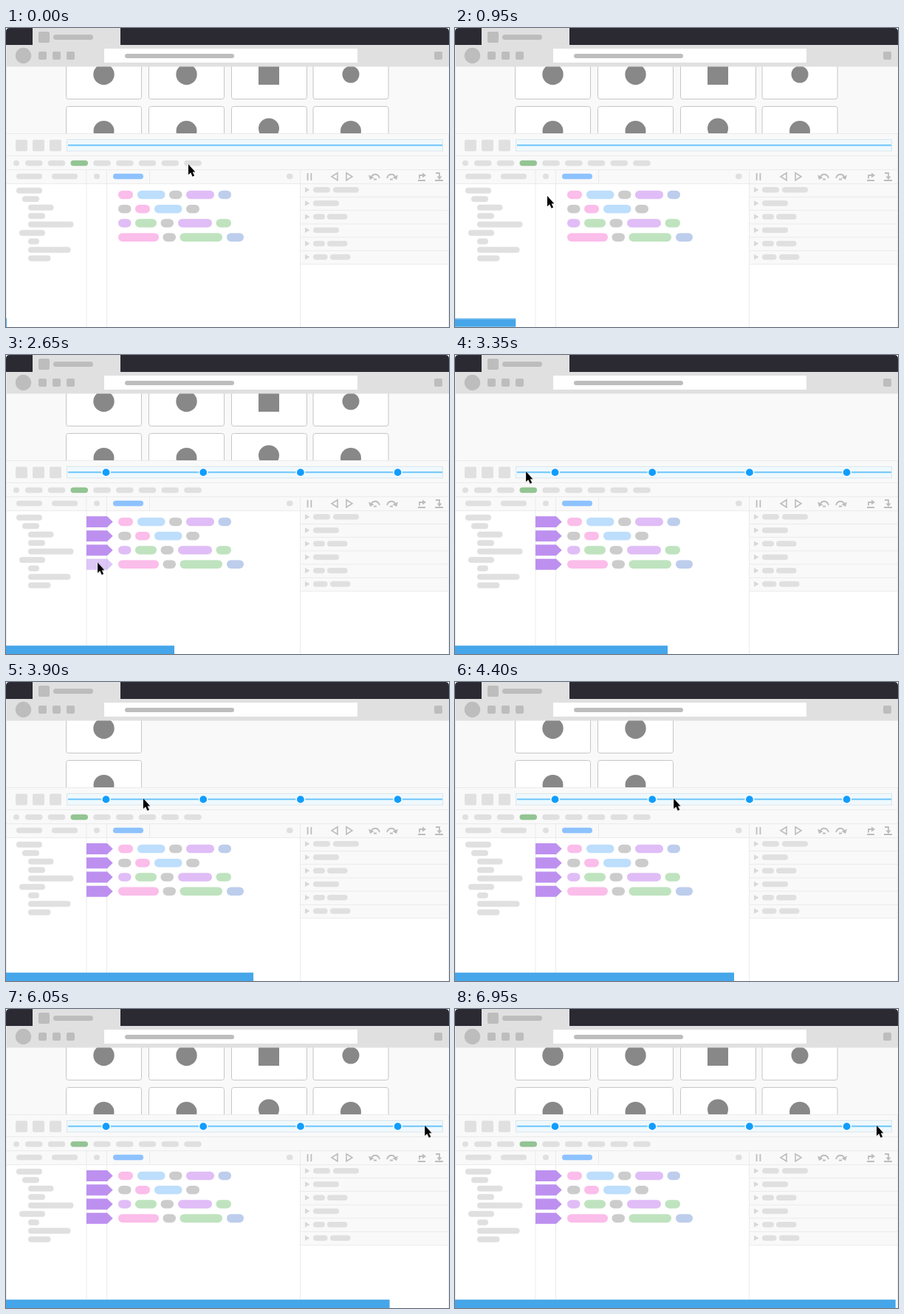
An HTML page that plays this animation: 600x406 px, repeating every 7 s.

```html
<!DOCTYPE html>
<html lang="en">
<head>
<meta charset="utf-8">
<title>Debugger timeline</title>
<style>
  html, body { margin: 0; width: 100%; height: 100%; overflow: hidden; background: #fff; }
  svg { display: block; width: 600px; height: 406px; }
  .anim, .dot, .mark, .card, #cursor, #bar { animation: 7s linear infinite; }
  .dot, .card { animation-timing-function: step-end; }

  #bar { animation-name: load; }
  @keyframes load { from { transform: scaleX(.0015); } to { transform: scaleX(1.0015); } }

  #cursor { animation-name: roam; }
  @keyframes roam {
    0% { transform: translate(247px, 185px); animation-timing-function: ease-in-out; }
    11% { transform: translate(125px, 228px); }
    14.3% { transform: translate(125px, 228px); }
    38.9% { transform: translate(124px, 284px); animation-timing-function: ease-in-out; }
    46.4% { transform: translate(96px, 158px); }
    47.86% { transform: translate(96px, 158px); animation-timing-function: cubic-bezier(.4, .2, .67, .67); }
    62.86% { transform: translate(296px, 158px); }
    77.14% { transform: translate(497px, 158px); animation-timing-function: cubic-bezier(.3, .73, .6, 1); }
    90%, 100% { transform: translate(571px, 158px); }
  }

  .dot0 { animation-name: dot0; } .dot1 { animation-name: dot1; }
  .dot2 { animation-name: dot2; } .dot3 { animation-name: dot3; }
  @keyframes dot0 { 0% { opacity: 0; } 15%, 100% { opacity: 1; } }
  @keyframes dot1 { 0% { opacity: 0; } 22.14%, 100% { opacity: 1; } }
  @keyframes dot2 { 0% { opacity: 0; } 29.29%, 100% { opacity: 1; } }
  @keyframes dot3 { 0% { opacity: 0; } 36.43%, 100% { opacity: 1; } }

  .mark0 { animation-name: mark0; } .mark1 { animation-name: mark1; }
  .mark2 { animation-name: mark2; } .mark3 { animation-name: mark3; }
  @keyframes mark0 { 0%, 15% { opacity: 0; } 17.86%, 100% { opacity: 1; } }
  @keyframes mark1 { 0%, 22.14% { opacity: 0; } 25%, 100% { opacity: 1; } }
  @keyframes mark2 { 0%, 29.29% { opacity: 0; } 32.14%, 100% { opacity: 1; } }
  @keyframes mark3 { 0%, 36.43% { opacity: 0; } 39.29%, 100% { opacity: 1; } }

  /* cards vanish together, then return as the cursor passes each dot */
  .card0 { animation-name: card0; } .card1 { animation-name: card1; }
  .card2 { animation-name: card2; } .card3 { animation-name: card3; }
  @keyframes card0 { 0% { opacity: 1; } 45.71% { opacity: 0; } 52.14%, 100% { opacity: 1; } }
  @keyframes card1 { 0% { opacity: 1; } 45.71% { opacity: 0; } 60.86%, 100% { opacity: 1; } }
  @keyframes card2 { 0% { opacity: 1; } 45.71% { opacity: 0; } 70.17%, 100% { opacity: 1; } }
  @keyframes card3 { 0% { opacity: 1; } 45.71% { opacity: 0; } 79.86%, 100% { opacity: 1; } }
</style>
</head>
<body>
<svg viewBox="0 0 600 406">
  <rect y="52" width="600" height="92" fill="#f9f9f9"/>
  <g id="cards"></g>

  <!-- browser chrome -->
  <path d="M0 23V5Q0 0 5 0H595Q600 0 600 5V23Z" fill="#2b2932"/>
  <path d="M36 0H155V23H600V52.5H0V23H36Z" fill="#e0e0e0"/>
  <path d="M.5 23V143" stroke="#ececec"/>
  <rect x="133" y="28" width="343" height="19" fill="#fff"/>
  <circle cx="23.5" cy="37.5" r="10.7" fill="#bdbdbd"/>
  <g id="chrome"></g>

  <!-- panel backgrounds -->
  <rect y="143" width="600" height="69" fill="#f9f9f9"/>
  <rect y="211" width="600" height="195" fill="#fff"/>
  <rect x="399" y="211" width="201" height="110" fill="#f9f9f9"/>
  <path d="M0 143.5H600M0 173.5H600M0 192.5H600M0 211.5H600M.5 144V406M599.5 144V406M109 192V406M136.5 192V406M194.5 192V211M398.5 192V406M399 229.5H600M399 247.5H600M399 266H600M399 284H600M399 302.5H600M399 320.8H600" fill="none" stroke="#ebebeb"/>

  <rect x="82.5" y="151.5" width="509" height="15.5" fill="#eff9fe" stroke="#dbe6ec"/>
  <path d="M84 159.3H591" stroke="#6cc5fa" stroke-width="2"/>
  <g id="pills"></g>
  <g id="dots"></g>

  <!-- debugger controls -->
  <g fill="none" stroke="#bdbdbd" stroke-width="1.8">
    <path d="M408.6 197V207M413.4 197V207"/>
    <path d="M449 196.8V206.8L441 201.8ZM461 196.8V206.8L469 201.8Z" stroke-width="1.6"/>
    <path d="M494 204C496 197 504 197 506 204M516 204C518 197 526 197 528 204"/>
    <path d="M558 207H568M560 204.500V200H565M581 207H592M582 197H587V203"/>
  </g>
  <path d="M491 199.500L493 206L498.500 203ZM531 199.500L529 206L523.500 203ZM564 196.500L569 200L564 203.500ZM583.500 201.500H590.500L587 206ZM498 206.500h4v-2h-4ZM520 206.500h4v-2h-4Z" fill="#bdbdbd"/>

  <g id="marks"></g>
  <rect id="bar" y="394.6" width="600" height="11.4" fill="#45a6e9"/>
  <path id="cursor" d="M0 0V14.200L3.200 11.300L5.600 16.700L8.100 15.600L5.700 10.400H9.300Z" fill="#000" stroke="#fff" stroke-width=".8" paint-order="stroke"/>
</svg>
<script>
  const NS = 'http://www.w3.org/2000/svg';
  const byId = id => document.getElementById(id);

  function add(parent, tag, attrs) {
    const el = document.createElementNS(NS, tag);
    for (const key in attrs) el.setAttribute(key, attrs[key]);
    return parent.appendChild(el);
  }

  function box(parent, x1, x2, y, h, fill, rx) {
    add(parent, 'rect', { x: x1, y: y - h / 2, width: x2 - x1, height: h, rx, fill });
  }

  const pills = byId('pills'), chrome = byId('chrome');
  const pill = (x1, x2, y, h = 7.5, fill = '#e0e0e0') => box(pills, x1, x2, y, h, fill, h / 2);

  // page cards with plain badges
  const cardX = [81.5, 193.5, 305.5, 416];
  const badgeX = [132.5, 244.5, 356, 467];
  cardX.forEach((x, i) => {
    const g = add(byId('cards'), 'g', { class: `card card${i}` });
    [[30, 66.5], [106.5, 60]].forEach(([y, height]) =>
      add(g, 'rect', { x, y, width: 102, height, rx: 3, fill: '#fff', stroke: '#c6c6c6' }));
    const cx = badgeX[i], fill = '#888';
    if (i === 2) box(g, cx - 14, cx + 14, 63, 28, fill, 0);
    else add(g, 'circle', { cx, cy: 63, r: i === 3 ? 11.5 : 14.2, fill });
    add(g, 'circle', { cx, cy: i === 2 ? 136.5 : 140, r: 14, fill });
  });

  // tab, toolbar buttons and address
  box(chrome, 44, 59, 12.5, 15, '#bdbdbd', 2);
  box(chrome, 64, 118, 12.5, 7, '#bdbdbd', 3.5);
  box(chrome, 161, 309, 38, 6, '#bdbdbd', 3);
  [44, 63, 82, 580].forEach(x => box(chrome, x, x + 11, 37.5, 11, '#bdbdbd', 2));

  // timeline buttons and panel tabs
  [13, 36, 59].forEach(x => box(pills, x, x + 16, 159.5, 15.5, '#e0e0e0', 2));
  pill(10, 18, 183.5);
  for (let i = 0; i < 8; i++) {
    const x = 26 + i * 30.75;
    pill(x, x + 23.5, 183.5, 7.5, i === 2 ? '#93c493' : undefined);
  }
  [[14, 49], [62, 97], [119, 127], [380, 388.5]].forEach(([a, b]) => pill(a, b, 201.5));
  pill(145, 186, 201.5, 7.5, '#8dc2ff');

  // source tree
  [[14, 49], [22, 45], [30, 64.5], [30, 53], [30, 91.5], [18, 53], [30, 45], [30, 87.5], [30, 60.5]]
    .forEach(([a, b], i) => pill(a, b, 220.8 + i * 11.5, 8));

  // code tokens: colour key, start, end
  const ink = { p: '#fbbdea', b: '#bddefc', g: '#cccccc', v: '#e0bdf6', n: '#bdcdec', e: '#bfe3bf' };
  const rowY = i => 226.4 + i * 19.25;
  [
    'p 152 172,b 178 215.5,g 221 238.5,v 244 282,n 287.5 305',
    'g 152 169.5,p 175 195,b 201 238.5,g 244 262',
    'v 152 169.5,e 175 204,g 209.5 227,v 233 279,e 284.5 305',
    'p 152 207,g 212.500 230,e 235.500 293,n 299 322'
  ].forEach((row, i) => row.split(',').forEach(token => {
    const [c, a, b] = token.split(' ');
    pill(+a, +b, rowY(i), 11.5, ink[c]);
  }));

  // collapsible side rows
  [[[416, 439], [443, 478]], [[416, 451]], [[416, 432], [435, 462.5]],
   [[416, 451]], [[416, 432], [435, 462.5]], [[416, 435.5], [439, 466.5]]]
    .forEach((row, i) => {
      const y = 219.8 + i * 18.25;
      add(pills, 'path', { d: `M405 ${y - 3.7}L411.5 ${y}L405 ${y + 3.7}Z`, fill: '#d8d8d8' });
      row.forEach(([a, b]) => pill(a, b, y));
    });

  // breakpoints and their timeline dots
  for (let i = 0; i < 4; i++) {
    add(byId('dots'), 'circle', {
      class: `dot dot${i}`, cx: 135.5 + i * 131.7, cy: 159.4, r: 5.7,
      fill: '#119dfe', stroke: '#f3faff', 'stroke-width': 1.6
    });
    add(byId('marks'), 'path', {
      class: `mark mark${i}`, d: `M109 ${rowY(i) - 7.5}h28l7.700 7.500l-7.700 7.500h-28Z`, fill: '#bd90f0'
    });
  }
</script>
</body>
</html>
```
